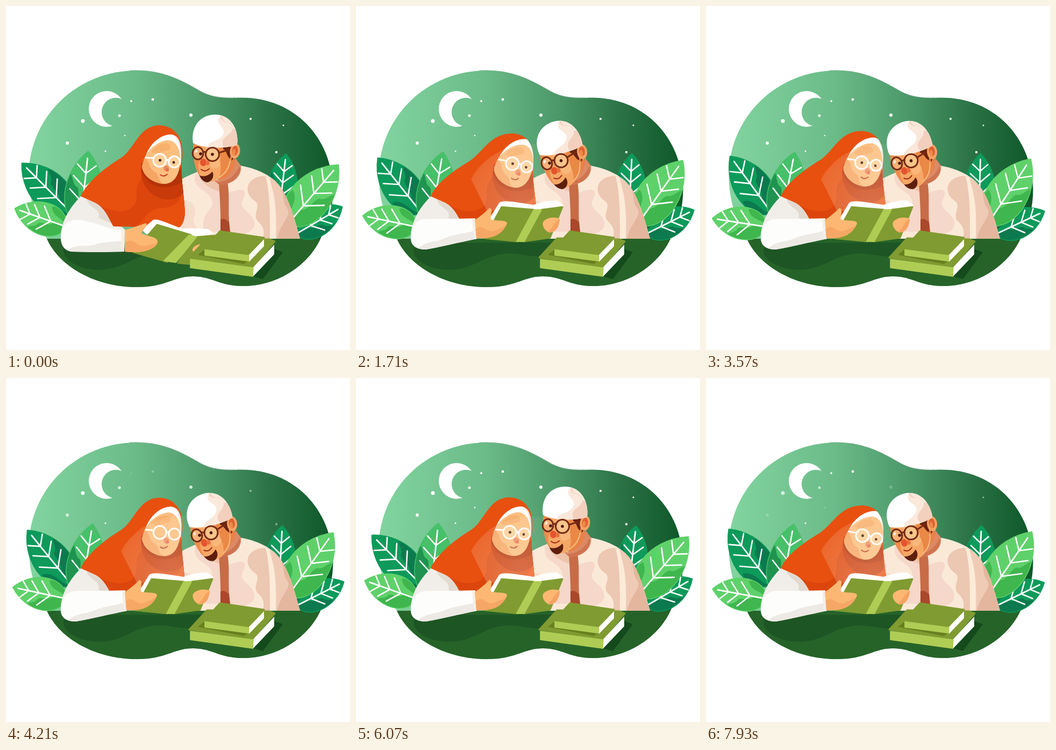
An HTML page with a canvas that plays this animation: 640 by 640 pixels, repeating every 8 s.

```html
<!DOCTYPE html>
<html lang="en">
<head>
<meta charset="utf-8">
<title>Reading together</title>
<style>
html, body { margin: 0; width: 100%; height: 100%; overflow: hidden; background: #fff; }
canvas { display: block; width: 100vw; height: 100vh; }
</style>
</head>
<body>
<canvas id="stage"></canvas>
<script>
const SIZE = 640, LOOP = 8000;
const canvas = document.getElementById('stage');
const ctx = canvas.getContext('2d');

// ---------- helpers ----------
const clamp = v => Math.max(0, Math.min(1, v));
const smooth = v => { v = clamp(v); return v * v * (3 - 2 * v); };
const rad = deg => deg * Math.PI / 180;

// Eased value at time t between [time, value] keys.
function keyed(keys, t) {
  if (t <= keys[0][0]) return keys[0][1];
  for (let i = 1; i < keys.length; i++) {
    const [t0, a] = keys[i - 1], [t1, b] = keys[i];
    if (t < t1) return a + (b - a) * smooth((t - t0) / (t1 - t0));
  }
  return keys[keys.length - 1][1];
}

// Blends two path strings that share the same commands.
function mix(a, b, p) {
  const nb = b.match(/-?[\d.]+/g);
  let i = 0;
  return a.replace(/-?[\d.]+/g, n => +n + (nb[i++] - n) * p);
}

function fill(d, color) {
  ctx.fillStyle = color;
  ctx.fill(new Path2D(d));
}

function line(d, color, width) {
  ctx.strokeStyle = color;
  ctx.lineWidth = width;
  ctx.stroke(new Path2D(d));
}

// Flat face with softly rounded corners.
function slab(d, color, round = 2) {
  fill(d, color);
  line(d, color, round);
}

function oval(x, y, rx, ry, color, turn = 0) {
  ctx.fillStyle = color;
  ctx.beginPath();
  ctx.ellipse(x, y, rx, ry, rad(turn), 0, 7);
  ctx.fill();
}

function ring(x, y, rx, ry, color, width) {
  ctx.strokeStyle = color;
  ctx.lineWidth = width;
  ctx.beginPath();
  ctx.ellipse(x, y, rx, ry, 0, 0, 7);
  ctx.stroke();
}

function group(draw, clip) {
  ctx.save();
  if (clip) ctx.clip(new Path2D(clip));
  draw();
  ctx.restore();
}

function turnAbout(x, y, deg, dx = 0, dy = 0) {
  ctx.translate(x + dx, y + dy);
  ctx.rotate(rad(deg));
  ctx.translate(-x, -y);
}

// ---------- night scene ----------
const BLOB = 'M76 433 C50 390 42 350 42.5 310 C46 205 132 120 243 120 C300 120 335 144 362 159 ' +
  'C380 169 402 172 425 171 C530 164 606 240 608.5 340 C609 375 600 405 585 433 ' +
  'C560 487 500 521 442 521 C395 521 385 503 348 503 C310 503 300 523 242 523 C170 523 100 487 76 433 Z';
const RIM = 'M230 120.5 C295 117 335 144 362 159 C380 169 402 172 425 171';

const sky = ctx.createLinearGradient(43, 0, 608, 0);
[[0, '#82d49f'], [.35, '#6bbb88'], [.6, '#4a9667'], [.8, '#2a7245'], [1, '#0d5728']]
  .forEach(stop => sky.addColorStop(...stop));

// x, y, radius, then how far the star fades at each dip
const DIPS = [900, 4170, 5260, 7950];
const STARS = [
  [143, 214, 3.5, 0, .1, .7, .3], [114, 255, 2.9, .25, .3, .2, .8], [211, 204, 2.5, 0, 0, .7, .4],
  [233, 177, 1.9, .9, .9, 0, .15], [273, 174, 2.4, .8, .75, 0, 0], [221, 241, 1.3, 1, 1, 0, .7],
  [185, 270, 1.5, 0, 0, 1, 0], [344, 203, 3, .1, .25, .3, .8], [455, 210, 2.1, .5, .55, 0, 1],
  [516, 222, 1.5, 1, 1, 0, .5], [503, 272, 2.2, .6, .6, 0, 1]
];

function drawSky(t) {
  line(RIM, '#a5bfae', 2);
  fill(BLOB, sky);
  for (const [x, y, r, ...depths] of STARS) {
    const fade = depths.reduce((sum, d, i) => sum + d * clamp(1.1 - Math.abs(t - DIPS[i]) / 600), 0);
    ctx.globalAlpha = clamp(1 - fade);
    oval(x, y, r, r, '#fff');
  }
  ctx.globalAlpha = 1;
  fill('M215 173 A33.3 33.3 0 1 0 198 223 A26.5 26.5 0 1 1 215 173 Z', '#fff');
}

function drawGround() {
  group(() => {
    ctx.fillStyle = '#266329';
    ctx.fillRect(40, 433, 580, 100);
    fill('M112 441 C94 462 125 491 175 491 C218 490 236 465 275 461 C305 458 330 470 365 466 L365 440 Z', '#1e5524');
  }, BLOB);
}

// ---------- leaves ----------
const LIGHT = ['#5fd16a', '#3fb64e'], MID = ['#46c069', '#1f9450'], DARK = ['#0d9a5a', '#0c7a4e'];
// base, tip, half width, swing in degrees, colours, shaded side
const LEFT = [
  [122, 385, 30, 293, 34, 10, DARK, 1],
  [138, 410, 153, 271, 35, 5.5, MID, -1],
  [113, 411, 17, 377, 30, -12, LIGHT, -1]
];
const RIGHT = [
  [508, 386, 521, 276, 28, -6, DARK, -1],
  [540, 424, 625, 374, 27, 6, DARK, 1],
  [524, 406, 618, 296, 38, -8, LIGHT, 1]
];

function drawLeaf([bx, by, tx, ty, w, swing, [base, shade], side], sway) {
  const len = Math.hypot(tx - bx, ty - by);
  const outline = `M0 0 C${len * .08} ${w * 1.2} ${len * .65} ${w * 1.42} ${len} 0 ` +
    `C${len * .65} ${-w * 1.42} ${len * .08} ${-w * 1.2} 0 0 Z`;
  group(() => {
    ctx.translate(bx, by);
    ctx.rotate(Math.atan2(ty - by, tx - bx) + rad(swing * sway));
    slab(outline, base, 3);
    group(() => {
      const y = k => side * w * k;
      fill(`M0 0 L0 ${y(1.2)} L${len * .7} ${y(1.2)} C${len * .75} ${y(.6)} ${len * .55} ${y(.75)} ${len * .52} ${y(.4)} ` +
        `C${len * .48} ${y(.15)} ${len * .3} ${y(.4)} ${len * .25} 0 Z`, shade);
      fill(`M0 0 C${len * .1} ${y(-.5)} ${len * .3} ${y(-.2)} ${len * .38} ${y(-.9)} L0 ${y(-1.2)} Z`, shade);
    }, outline);
    line(`M${len * .06} 0 L${len * .91} 0`, '#fff', 2.8);
    for (const [at, size] of [[.31, .76], [.52, .64], [.71, .5]]) {
      const x = len * at, v = w * size;
      line(`M${x + v * .9} ${-v} L${x} 0 L${x + v * .9} ${v}`, '#fff', 2.6);
    }
  });
}

// ---------- man ----------
const ROBE = 'M322 433 L322 325 C335 317 348 312 362 306 C380 330 420 330 436 297 ' +
  'C465 302 492 314 507 332 C527 357 538 400 547 433 Z';
const CAP = 'M348 255 C343 225 361 202 390 202 C419 203 433 230 430 258 C418 265 366 266 348 255 Z';
const FACE = 'M349 256 C347 275 350 300 359 314 C368 329 385 329 396 321 C412 313 421 295 423 258 Z';

function drawRobe() {
  fill(ROBE, '#fbe9d8');
  group(() => {
    fill('M352 312 C345 345 380 340 384 365 C386 382 362 380 368 420 L402 420 L398 330 Z', '#f5d8c9');
    fill('M322 365 C345 355 358 375 350 392 C345 405 360 410 356 433 L322 433 Z', '#f5dccb');
    fill('M357 310 C362 330 380 340 398 346 L398 330 L370 305 Z', '#ecc4ab');
    fill('M414 348 C430 340 455 335 440 362 C432 380 465 385 462 408 C458 425 440 420 434 433 L414 433 Z', '#f5d8c9');
    fill('M478 316 C445 320 442 348 462 362 C478 372 455 388 470 402 C482 412 480 425 478 433 L496 433 L490 318 Z', '#ecc7b1');
    fill('M486 318 C504 345 503 400 502 433 L550 433 L550 370 L507 325 Z', '#efcbb6');
    fill('M502 330 C522 342 512 362 522 375 C534 390 512 400 504 433 L550 433 L540 360 L512 330 Z', '#e4b69d');
    fill('M483 317 C492 350 491 400 491 433 L501 433 C502 395 499 350 490 319 Z', '#fdebd8');
  }, ROBE);
  fill('M396 329 L412 328 C417 350 412 392 417 421 L399 421 C400 390 398 360 396 329 Z', '#c76c47');
  fill('M399 397 C408 393 412 402 415 401 L417 421 L399 421 Z', '#a9482b');
  fill('M382 312 L424 278 L430 305 L400 326 Z', '#e98146');
  fill('M386 324 C408 326 428 308 426 282 L437 297 C440 318 420 334 396 332 Z', '#dc8a64');
  fill('M392 328 C412 326 426 318 434 298 L436 303 C434 322 414 334 396 332 Z', '#cf7450');
}

function drawManHead(p) {
  group(() => {
    turnAbout(427, 270, -15 * p, -5.5 * p, p);
    fill('M402 258 L424 258 C424 275 428 284 418 288 Z', '#6b240f');
    fill(FACE, '#f6a766');
    group(() => {
      fill('M400 255 C385 285 412 290 392 330 L430 320 L430 250 Z', '#ea8846');
      fill('M348 255 C365 262 372 270 364 285 C356 290 356 305 362 318 L345 310 Z', '#ee8b4d');
      fill('M372 262 C390 258 402 270 398 288 C404 300 382 310 380 296 Z', '#f9b87a');
      fill('M404 255 L420 255 L417 284 C410 280 412 270 404 266 Z', '#6b240f');
    }, FACE);
    line('M396 319 C408 312 414 303 417 288', '#f7bd83', 2);
    oval(426, 270, 9.5, 14, '#f5a263', 8);
    oval(426, 269, 5.5, 9, '#dd6334', 8);
    oval(424, 272, 3, 6, '#ee8b4d', 8);
    fill(CAP, '#fff');
    group(() => {
      fill('M398 205 C385 222 415 225 402 242 C393 254 372 250 375 266 L435 266 L435 215 Z', '#fae8db');
      fill('M400 203 C396 220 420 212 421 226 C423 242 395 242 405 262 L435 262 L435 210 Z', '#f2d0bd');
      fill('M402 204 C402 220 424 213 421 228 L430 230 L420 206 Z', '#fbe9dc');
    }, CAP);
    oval(367, 291, 6, 7, '#e5552d');
    oval(375, 292, 3.5, 4.5, '#e8713e');
    oval(357, 274, 10, 11.5, 'rgba(252,210,155,.55)');
    oval(384, 276, 12, 12, 'rgba(252,210,155,.5)');
    oval(362, 275, 2.8, 2.8, '#4a180a');
    oval(384, 276, 2.8, 2.8, '#4a180a');
    oval(354, 270, 2, 3, 'rgba(255,255,255,.8)', 30);
    ring(357, 274, 9.8, 11.5, '#752a12', 3);
    ring(384, 276, 12.5, 12.5, '#752a12', 3);
    line('M367 272 Q370 270 372 273 M396 273 L413 268', '#752a12', 3);
    line('M363 304 Q370 310 378 303', '#a5341a', 2.2);
    fill('M360 315 C368 319 378 315 384 308 C388 316 384 327 374 328 C367 327 362 321 360 315 Z', '#5d1e0c');
  });
}

// ---------- woman ----------
const HOOD_UP = 'M139 354 C150 328 185 300 215 282 C240 265 247 222 286 222 C317 223 331 250 328 280 ' +
  'C324 318 331 345 333 385 C332 398 328 408 322 412 L200 410 C192 398 186 376 166 366 Z';
const HOOD_DOWN = 'M139 354 C150 328 184 305 212 288 C238 270 250 237 291 237 C321 238 332 262 330 292 ' +
  'C327 320 333 345 335 372 C336 390 330 408 322 412 L200 410 C192 398 186 376 166 366 Z';
const HER_FACE = 'M256 288 C260 270 285 248 305 250 C321 254 326 275 324 292 C322 315 312 331 294 331 C273 330 254 315 253 298 Z';

function drawWoman(hood, p, blink) {
  fill('M140 353 C123 371 105 393 102 425 L180 440 L225 420 L205 400 C190 378 170 362 140 353 Z', '#f1eee9');
  fill('M150 356 C150 376 178 376 172 394 L220 415 L205 400 C190 378 175 364 150 356 Z', '#e2dad0');
  fill(hood, '#e8500f');
  group(() => {
    fill('M166 366 C205 392 245 385 243 352 C240 325 262 318 256 300 L340 330 L340 420 L190 420 Z', '#dc460d');
    fill('M240 412 C262 395 262 378 290 376 C318 374 325 362 330 340 L345 420 Z', '#e8500f');
    turnAbout(294, 315, 6 * p, 2 * p, 7 * p);
    fill('M252 292 C247 325 262 348 285 357 C305 365 325 357 332 345 L327 300 Z', '#c93a0a');
    fill('M251 305 C262 335 290 347 328 328 L326 305 Z', '#b53108');
    fill('M257 290 C262 260 286 238 308 239 C324 242 329 265 325 296 L300 270 Z', '#fff');
    fill('M312 240 C326 245 328 268 325 290 C325 265 322 250 312 240 Z', '#f1e0d5');
    fill(HER_FACE, '#fcbf7f');
    group(() => {
      fill('M250 280 C272 285 262 300 276 308 C288 315 280 328 298 332 L250 335 Z', '#f6a663');
      fill('M270 272 C280 255 302 250 306 262 C306 272 288 268 284 275 Z', '#f8b06d');
      oval(298, 302, 5, 5.5, '#ee8a62');
      oval(300, 305, 3, 3, '#e56c4a');
    }, HER_FACE);
    if (!blink) {
      oval(286, 287, 12, 12, 'rgba(255,228,180,.5)');
      oval(313, 290, 10, 10, 'rgba(255,228,180,.5)');
      oval(286.5, 287, 2.5, 2.5, '#4a180a');
      oval(312, 291, 2.4, 2.4, '#4a180a');
    }
    ring(286, 287, 12, 12, '#fff', 3);
    ring(313, 290, 10.5, 10.5, '#fff', 3);
    line('M260 282 L274 283 M298 287 Q300 285 303 288', '#fff', 3);
    line('M287 314 Q294 319 300 313', '#c04325', 2.1);
  }, hood);
}

// Light that rises from the open pages.
function drawGlow(amount) {
  const light = ctx.createRadialGradient(312, 372, 10, 312, 372, 135);
  light.addColorStop(0, `rgba(255,235,215,${.3 * amount})`);
  light.addColorStop(.75, `rgba(255,235,215,${.17 * amount})`);
  light.addColorStop(1, `rgba(255,235,215,${.05 * amount})`);
  fill('M244 382 L214 322 C235 283 277 257 327 257 C372 257 410 272 432 297 L386 372 Z', light);
}

function drawSleeve(p) {
  const cloth = mix('M102 432 C102 412 110 397 134 398 C165 400 190 418 221 416 L220 457 C185 458 150 458 122 457 C108 455 102 444 102 432 Z',
    'M102 432 C102 412 110 396 134 396 C165 396 190 396 222 395 L225 433 C190 440 160 448 130 453 C112 453 102 446 102 432 Z', p);
  fill(cloth, '#fdfdfc');
  group(() => {
    fill(mix('M112 458 C125 440 150 450 165 444 C185 437 200 440 221 436 L221 460 Z',
      'M112 456 C125 436 150 440 165 432 C185 424 200 424 225 417 L226 440 Z', p), '#ede9e4');
    fill(mix('M214 414 L223 414 L222 460 L215 460 Z', 'M216 393 L224 393 L227 436 L219 436 Z', p), '#f4efe9');
  }, cloth);
}

// ---------- books ----------
const OLIVE = '#809b31', LIME = '#afcd54', SKIN = '#fcb873';

function drawOpenBook(p) {
  const part = (a, b, color, round) => slab(mix(a, b, p), color, round);
  part('M254 416 L274 399 C282 395 305 408 328 415 C345 414 362 415 376 416 L384 422 L345 436 L285 412 L262 424 Z',
    'M249 396 L267 367 C272 361 300 366 330 371 C345 366 362 362 374 363 L385 371 L340 381 L274 376 L258 398 Z', '#fff', 2);
  part('M281 407 L344 426 L300 476 L237 458 Z', 'M271 374 L331 379 L300 438 L239 432 Z', OLIVE, 3);
  part('M352 430 L402 426 L384 484 L320 478 Z', 'M345 379 L384 374 L361 431 L312 438 Z', OLIVE, 3);
  part('M341 426 L354 430 L316 477 L294 474 Z', 'M331 379 L345 379 L313 438 L299 438 Z', LIME, 2);
  fill(mix('M347 452 C352 443 364 441 376 445 C376 459 370 469 355 459 C349 459 346 456 347 452 Z',
    'M348 402 C354 394 368 391 379 396 C378 410 372 423 358 421 C350 416 346 409 348 402 Z', p), SKIN);
  fill(mix('M362 460 C372 455 374 450 376 445 C376 459 370 469 362 460 Z',
    'M356 420 C368 415 365 404 379 396 C378 410 372 423 356 420 Z', p), '#f6a260');
}

function drawHand(p) {
  const hand = mix('M221 417 C235 413 248 408 260 404 C266 407 254 417 252 423 C266 429 284 430 282 440 C278 454 250 461 221 457 Z',
    'M221 398 C231 392 240 384 248 376 C256 377 250 387 251 397 C262 401 282 397 281 405 C274 420 262 434 224 432 Z', p);
  fill(hand, SKIN);
  group(() => fill(mix('M221 440 C240 428 240 450 262 446 L284 440 L260 465 L221 460 Z',
    'M221 416 C238 402 240 424 258 418 L284 406 L262 440 L222 436 Z', p), '#f7a765'), hand);
}

function drawStack() {
  fill('M459 503 L499 452 L515 458 L478 508 Z', '#154a1c');
  slab('M341 468 L374 432 L490 434 L500 438 L460 485 Z', OLIVE, 3);
  fill('M460 486 L499 444 L499 462 L459 504 Z', '#fff');
  slab('M343 471 L460 487 L459 503 L343 487 Z', LIME, 1.5);
  fill('M372 451 L357 463 L442 480 L458 470 Z', '#677f1e');
  slab('M368 452 L398 419 L480 431 L452 463 Z', OLIVE, 3);
  fill('M452 463 L480 434 L480 447 L452 476 Z', '#fff');
  slab('M370 453 L452 464 L452 475 L370 464 Z', LIME, 1);
}

// ---------- timing ----------
const HER_NOD = [[0, 0], [1120, 1], [3100, 1], [4380, 0], [6260, 0], [7420, 1]];
const HIS_NOD = [[690, 0], [1790, 1], [4660, 1], [5720, 0], [6520, 0], [7630, 1]];

function draw(t) {
  const sway = (1 - Math.cos(2 * Math.PI * (t + 80) / 6000)) / 2;
  const lift = smooth((t - 40) / 960), glow = smooth((t - 250) / 600);
  const her = keyed(HER_NOD, t), his = keyed(HIS_NOD, t);
  const hood = mix(HOOD_UP, HOOD_DOWN, her);
  const blink = t > 4120 && t < 4300;

  ctx.fillStyle = '#fff';
  ctx.fillRect(0, 0, SIZE, SIZE);
  ctx.lineCap = ctx.lineJoin = 'round';
  drawSky(t);
  drawGround();
  [...LEFT, ...RIGHT].forEach(leaf => drawLeaf(leaf, sway));
  drawGlow(glow * .5);
  drawRobe();
  drawManHead(his);
  drawWoman(hood, her, blink);
  group(() => drawGlow(glow), hood);
  drawSleeve(lift);
  drawOpenBook(lift);
  drawHand(lift);
  drawStack();
}

function frame(now) {
  const w = Math.round(innerWidth * devicePixelRatio), h = Math.round(innerHeight * devicePixelRatio);
  if (canvas.width !== w || canvas.height !== h) {
    canvas.width = w;
    canvas.height = h;
  }
  ctx.setTransform(w / SIZE, 0, 0, h / SIZE, 0, 0);
  draw(Math.max(0, now - start) % LOOP);
  requestAnimationFrame(frame);
}

const start = performance.now();
frame(start);
</script>
</body>
</html>
```
